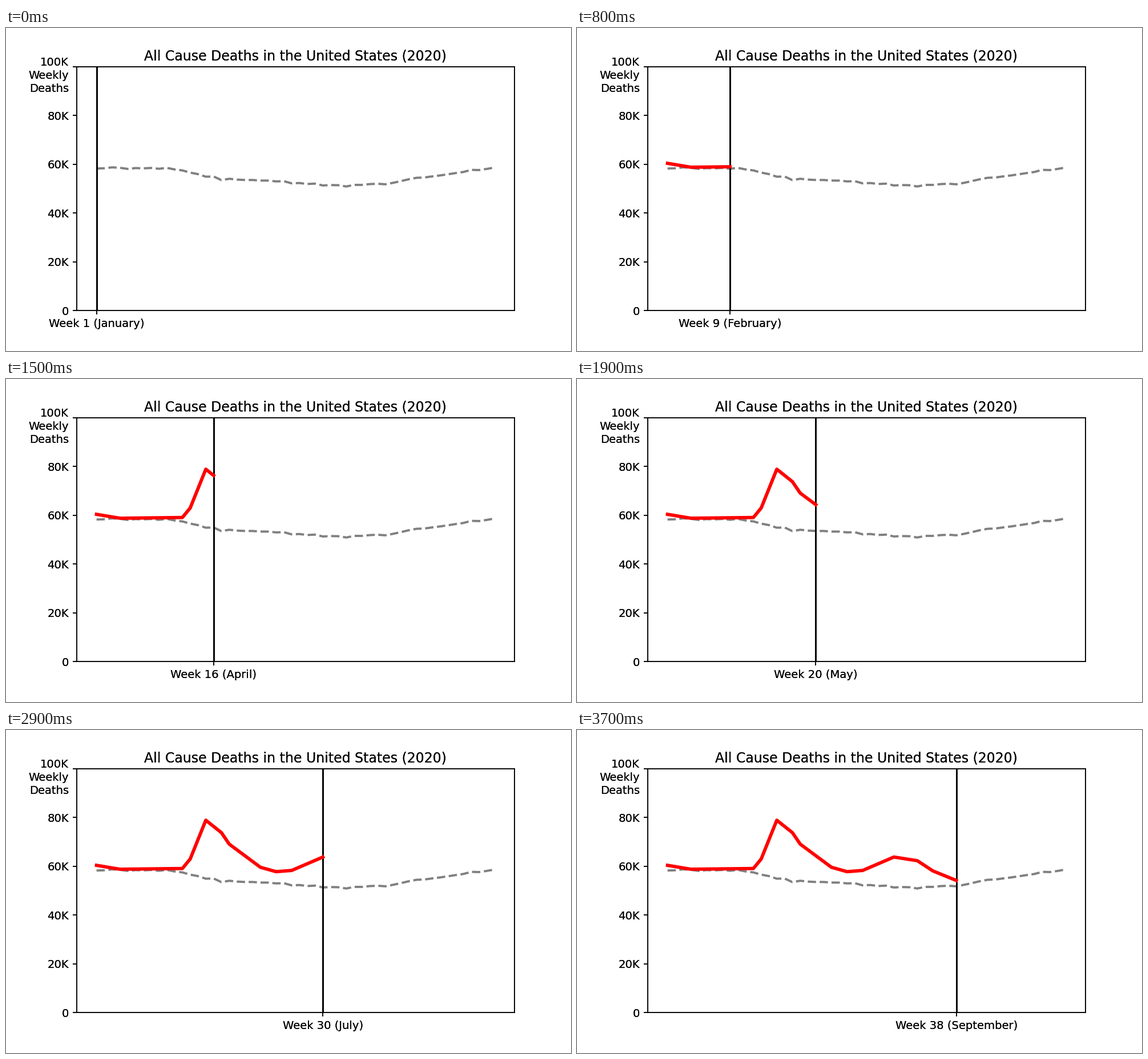
A matplotlib script that plays this animation: 990x566 px, repeating every 4800 ms.

```python
import numpy as np
import matplotlib.pyplot as plt
from matplotlib.animation import FuncAnimation

plt.rcParams["font.family"] = "DejaVu Sans"

STEP_MS = 100
FRAMES = 48
WEEKS = 52
LAST_WEEK = 38
MONTHS = ("January February March April May June July August "
          "September October November December").split()

# Turning points: (week, thousands of deaths)
AVERAGE = [(1, 58.4), (10, 58.5), (17, 53.9), (21, 53.7), (28, 52.1),
           (33, 51.2), (38, 52.0), (42, 54.3), (52, 58.6)]
CURRENT = [(1, 60.4), (4, 58.8), (12, 59.1), (13, 63.0), (15, 78.9),
           (17, 73.8), (18, 69.1), (22, 59.6), (24, 57.8), (26, 58.3),
           (30, 63.8), (33, 62.3), (35, 58.1), (38, 54.2)]


def curve(points, weeks):
    return np.interp(weeks, *zip(*points))


def week_label(week):
    """Name the week after the month of its last day."""
    end = np.datetime64("2020-01-04") + 7 * (week - 1)
    month = end.astype("datetime64[M]").astype(int) % 12
    return f"Week {week} ({MONTHS[month]})"


def add_layer(fig):
    ax = fig.add_axes([0.125, 0.125, 0.775, 0.755], facecolor="none")
    ax.set_title("All Cause Deaths in the United States (2020)")
    margin = 0.05 * (WEEKS - 1)
    ax.set_xlim(1 - margin, WEEKS + margin)
    ax.set_ylim(0, 100)
    ax.set_yticks(range(0, 101, 20), ["0", "20K", "40K", "60K", "80K", ""])
    ax.annotate("100K\nWeekly\nDeaths", (0, 1), xycoords="axes fraction",
                xytext=(-7, 8.8), textcoords="offset points",
                ha="right", va="top", linespacing=1.28)
    return ax


fig = plt.figure(figsize=(7, 4.002), dpi=141.43)
# Drawing the frame and text twice darkens their soft edges
layers = [add_layer(fig) for _ in range(2)]
ax = layers[0]

weeks = np.arange(1, WEEKS + 1)
wobble = np.random.default_rng(4).normal(0, 0.2, WEEKS)
current = curve(CURRENT, weeks[:LAST_WEEK])

ax.plot(weeks, curve(AVERAGE, weeks) + wobble, color="gray", lw=2, ls="--")
marker = ax.axvline(1, color="black", lw=1.5)
(trace,) = ax.plot([], [], color="red", lw=3)


def update(frame):
    week = min(frame + 1, LAST_WEEK)
    marker.set_xdata([week, week])
    shown = week if week > 1 else 0
    trace.set_data(weeks[:shown], current[:shown])
    for layer in layers:
        layer.set_xticks([week], [week_label(week)])
    return marker, trace


anim = FuncAnimation(fig, update, frames=FRAMES, interval=STEP_MS,
                     repeat=True, repeat_delay=0, blit=False)
plt.show()
```
